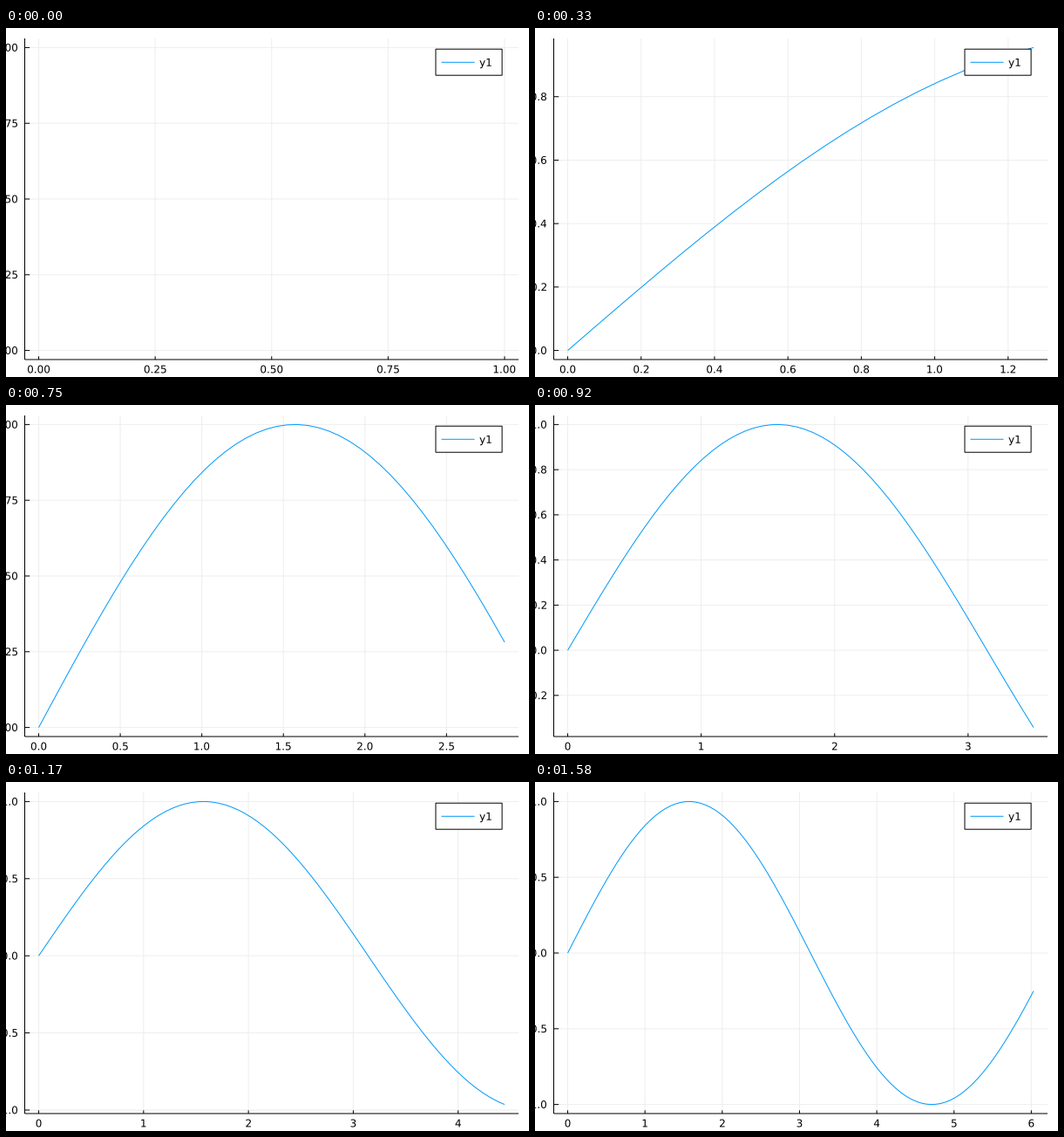
These frames come from a looping animation (600 by 400 pixels, 1.66 s). A matplotlib script:

```python
import math

import matplotlib.pyplot as plt
import numpy as np
from matplotlib.animation import FuncAnimation
from matplotlib.patches import PathPatch, Rectangle
from matplotlib.textpath import TextPath
from matplotlib.transforms import Affine2D

W, H = 600, 400
PX = 0.72  # points per pixel at 100 dpi
LEFT, RIGHT, TOP, BOTTOM = 21.5, 588, 12, 380
BLUE = "#009AFA"
GRID = "#eeeeee"
STEPS, PER_STEP = 20, 5
TICKS = 166  # ten-millisecond ticks in one loop
NICE = {1: 1.0, 5: 0.9, 2: 0.7, 2.5: 0.5, 3: 0.2}

plt.rcParams["font.family"] = "DejaVu Sans"
fig = plt.figure(figsize=(W / 100, H / 100), dpi=100, facecolor="white")
ax = fig.add_axes([0, 0, 1, 1])
ax.set_xlim(0, W)
ax.set_ylim(H, 0)
ax.axis("off")

xs = np.linspace(0, 2 * np.pi, 100)
ys = np.sin(xs)


def line(x, y, color="black", z=3):
    return ax.plot(x, y, color=color, lw=PX, zorder=z, snap=False,
                   solid_capstyle="butt")[0]


def label(x, y, s, align=0.5, z=3):
    """Outline text on baseline y; align 0 is left, 1 is right."""
    path = TextPath((0, 0), s, size=12)
    box = path.get_extents()
    start = x - box.x0 - align * box.width
    path = path.transformed(Affine2D().scale(1, -1).translate(start, y))
    return ax.add_patch(PathPatch(path, fc="black", lw=0, zorder=z, snap=False))


def limits(v):
    """Data range widened by three percent on each side."""
    lo, hi = (v.min(), v.max()) if len(v) > 1 else (0.0, 1.0)
    pad = 0.03 * (hi - lo)
    return lo - pad, hi + pad


def nice_ticks(lo, hi):
    """Choose tick spacing by granularity, coverage and niceness."""
    best = None
    for power in range(-3, 1):
        for q, nice in NICE.items():
            step = q * 10.0 ** power
            first = math.ceil(lo / step - 1e-9)
            last = math.floor(hi / step + 1e-9)
            count = last - first + 1
            if not 4 <= count <= 8:
                continue
            grain = 1 - abs(count - 5) / 5
            cover = 1.5 * (hi - lo) / ((count - 1) * step)
            score = grain / 4 + cover / 3 + nice / 4
            key = (round(score, 9), step, first, last)
            best = key if best is None else max(best, key)
    _, step, first, last = best
    digits = 0
    while abs(step * 10 ** digits - round(step * 10 ** digits)) > 1e-6:
        digits += 1
    return [(n * step, f"{n * step:.{digits}f}") for n in range(first, last + 1)]


def scene(k):
    """Build the grid, ticks, labels and curve of one step."""
    n = k * PER_STEP + 1
    x, y = xs[:n], ys[:n]
    x0, x1 = limits(x)
    y0, y1 = limits(y)

    def to_x(v):
        return LEFT + (v - x0) / (x1 - x0) * (RIGHT - LEFT)

    def to_y(v):
        return BOTTOM - (v - y0) / (y1 - y0) * (BOTTOM - TOP)

    parts = []
    for v, s in nice_ticks(x0, x1):
        p = to_x(v)
        parts += [line([p, p], [TOP, BOTTOM], GRID, 1),
                  line([p, p], [BOTTOM, BOTTOM - 3.7]),
                  label(p, 395.4, s)]
    for v, s in nice_ticks(y0, y1):
        p = to_y(v)
        parts += [line([LEFT, RIGHT], [p, p], GRID, 1),
                  line([LEFT, LEFT + 5.7], [p, p]),
                  label(13, p + 4.3, s, 1)]
    if n > 1:
        parts.append(line(to_x(x), to_y(y), BLUE, 4))
    return parts


# Axes and legend stay fixed
line([LEFT, LEFT], [TOP, BOTTOM])
line([LEFT, RIGHT], [BOTTOM, BOTTOM])
ax.add_patch(Rectangle((493, 24.2), 76.1, 30, fc="white", ec="black", lw=PX,
                       zorder=5, snap=False))
line([499.5, 537.5], [39.3, 39.3], BLUE, 6)
label(543.4, 43.7, "y1", 0, 6)

scenes = [scene(k) for k in range(STEPS)]


def update(tick):
    current = min(int((tick + 0.5) * 12 / 100), STEPS - 1)
    for k, parts in enumerate(scenes):
        for part in parts:
            part.set_visible(k == current)
    return []


anim = FuncAnimation(fig, update, frames=TICKS, interval=10, repeat=True,
                     repeat_delay=0, blit=False)
plt.show()
```
